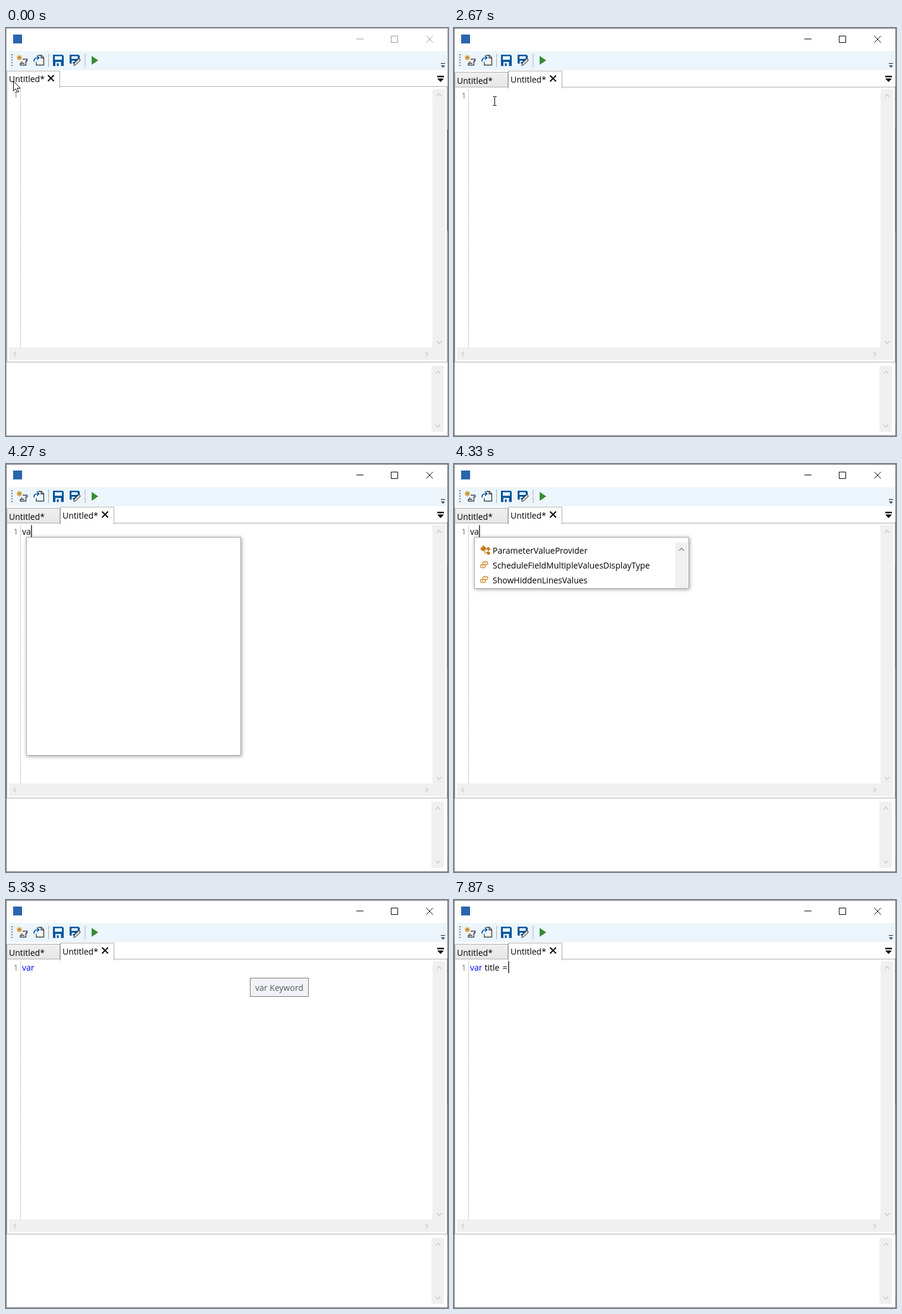
Recreate the animation shown at these times as an HTML page. Size 743x687 px, loop 8000 ms.

```html
<!DOCTYPE html>
<html lang="en">
<head>
<meta charset="utf-8">
<title>Script editor</title>
<style>
  html, body { margin: 0; width: 100%; height: 100%; overflow: hidden; background: #fff; }
  svg { display: block; width: 743px; height: 687px; font: 14px "Open Sans", "Noto Sans", sans-serif; }
  text { white-space: pre; }
  .line { fill: none; stroke: #acacac; }
  .bar { fill: #f0f0f0; }
  .chev { fill: none; stroke: #cdcdcd; stroke-width: 1.6; }
  .close { fill: none; stroke: #111; stroke-width: 2.2; }
  .blue { fill: #00539c; }
  .dark { fill: none; stroke: #3c3c3c; stroke-width: 1.4; }
  .gold { fill: none; stroke: #c27d1a; stroke-width: 1.2; }
  #popup { filter: drop-shadow(1px 1px 3px #0006); }
</style>
</head>
<body>
<svg viewBox="0 0 743 687">
  <defs>
    <path id="chev" class="chev" d="M-4 2L0-2L4 2"/>
    <path id="x" class="close" d="M-5-5L5 5M5-5L-5 5"/>
    <linearGradient id="tabFill" x2="0" y2="1">
      <stop stop-color="#f0f0f0"/><stop offset="1" stop-color="#e5e5e5"/>
    </linearGradient>
    <g id="enum" class="gold">
      <rect x="4.6" y=".6" width="8" height="5" rx="1.5"/>
      <rect x=".6" y="5.6" width="8" height="5" rx="1.5" fill="#fff"/>
      <path d="M7 3h3M3 8h3"/>
    </g>
  </defs>
  <rect width="743" height="687" fill="#fff"/>

  <!-- title bar -->
  <rect x="12" y="11" width="15" height="15" fill="#2a66ad"/>
  <path id="winButtons" fill="none" d="M589 18.5h12M647.5 13.5h11v11h-11zM706.5 13.5l11 11M717.5 13.5l-11 11"/>

  <!-- toolbar -->
  <rect x="5" y="39" width="736" height="32" rx="2" fill="#ecf5fc"/>
  <rect id="hover" x="14" y="41" width="27" height="27" fill="#cfe3f2"/>
  <path d="M10 44v20" stroke="#6b7480" stroke-width="2" stroke-dasharray="2 2.5"/>
  <path d="M22.5 45.5v9M18 50h9M19.3 46.8l6.4 6.4M25.7 46.8l-6.4 6.4" stroke="#d08a1d" stroke-width="1.4"/>
  <path class="dark" d="M28 52.5h7.5v3h-2v7h-9.5v-3h7M26.5 56v3.5"/>
  <path class="dark" d="M54 46h5.500l4 4v12.500h-12.500v-5M59 46v4.500h4.500"/>
  <path d="M47.500 56.500c-1.500-5 2-6.500 7-6.500M52 46.500l3.500 3.500l-3.500 3.500" fill="none" stroke="#00539c" stroke-width="1.700"/>
  <path d="M71.500 43v23M133 43v23" stroke="#a6adb5"/>
  <path class="blue" fill-rule="evenodd" d="M79 45h16l2 2v17h-18zM82 47.500v6h12v-6zM83 57v7h2.500v-4.500h3v4.500h4v-7z"/>
  <path class="blue" fill-rule="evenodd" d="M107 45h15l2 2v4l-9 9h-8zM110 47.500v4.500h10.500v-4.500zM110.500 55v5h2v-3h3v-2z"/>
  <path d="M114 63l1-4l7.500-7.500l2.500 2.500l-7.500 7.500z" fill="#fff" stroke="#444" stroke-width="1.200"/>
  <path d="M144 47l11 7.500l-11 7.500z" fill="#388a34"/>
  <path d="M731 59h7v1.500h-7zM731 63h7l-3.500 4z" fill="#444c55"/>

  <!-- document area -->
  <path class="line" d="M1.500 98V562.500H741.500V98"/>
  <path d="M725 80.500h11v2.500h-11zM725 85h11l-5.500 6z" fill="#000"/>
  <g id="oneTab">
    <path class="line" d="M1.500 99V72.500H90.500V98.500H742M90.500 98v3"/>
    <text x="5" y="91">Untitled*</text>
    <use href="#x" x="75.500" y="84.500"/>
  </g>
  <g id="twoTabs">
    <rect class="line" x="1.500" y="74.500" width="89" height="25" style="fill:url(#tabFill)"/>
    <text x="5" y="94">Untitled*</text>
    <path class="line" d="M91.500 102V72.500H181.500V102M181.500 99.500H742"/>
    <text x="95" y="92">Untitled*</text>
    <use href="#x" x="166.500" y="85"/>
  </g>
  <rect class="bar" x="717" y="103" width="21" height="456"/>
  <rect class="bar" x="5" y="538" width="713" height="21"/>
  <rect class="bar" x="715" y="569" width="21" height="111"/>
  <use id="upArrow" href="#chev" x="728"/>
  <use href="#chev" transform="translate(728 529) rotate(180)"/>
  <use href="#chev" transform="translate(15 549) rotate(-90)"/>
  <use href="#chev" transform="translate(707 549) rotate(90)"/>
  <use href="#chev" x="726" y="580"/>
  <use href="#chev" transform="translate(726 670) rotate(180)"/>
  <path d="M24.500 103V538" stroke="#a0a0a0" stroke-dasharray="1 1"/>

  <!-- editor -->
  <text id="lineNo" x="12.500" fill="#808080">1</text>
  <text id="keyword" x="27" y="119"></text>
  <text id="word" x="51.500" y="119"></text>
  <text id="sign" x="81.500" y="119"></text>
  <rect id="caret" y="103" width="1.300" height="20"/>

  <!-- completion list -->
  <g id="popup">
    <rect id="frame" class="line" x="34.500" y="123.500" width="360" style="fill:#fff"/>
    <g id="rows">
      <rect class="bar" x="372" y="132" width="21" height="77"/>
      <use href="#chev" x="382.500" y="144" style="filter:brightness(.7)"/>
      <path d="M44 143l5.500-6l5 4.500l-5.500 6zM54 142.500l3.500-3l4 3.500l-3.500 3.500zM54 149.500l3.500-3l4 3.500l-3.500 3.500z" fill="#c27d1a"/>
      <path class="gold" d="M50 144h5M52 144v6h4"/>
      <use href="#enum" x="44" y="164"/>
      <use href="#enum" x="44" y="189"/>
      <text x="65" y="151">ParameterValueProvider</text>
      <text x="65" y="176">ScheduleFieldMultipleValuesDisplayType</text>
      <text x="65" y="201">ShowHiddenLinesValues</text>
    </g>
  </g>
  <g id="tip">
    <rect x="410.500" y="131.500" width="98" height="31" fill="#f1f2f7" stroke="#767676"/>
    <text x="419" y="153" fill="#575757">var Keyword</text>
  </g>

  <rect id="border" x=".5" y=".5" width="742" height="686" fill="none"/>
  <path d="M742.500 171V342" stroke="#555"/>
  <path id="arrow" d="M.5.500v16.500l3.700-3.600l2.600 5.800l2.500-1.100l-2.500-5.700h5.200z" fill="#fff" stroke="#000"/>
  <path id="beam" d="M-3-7.500h2.500l.5.500l.5-.5h2.500M0-7v14M-3 7.500h2.500l.5-.5l.5.500h2.500" fill="none" stroke="#000"/>
</svg>
<script>
const LOOP = 8000;
const $ = id => document.getElementById(id);
const show = (id, on) => $(id).style.display = on ? "" : "none";
const set = (id, attrs) => { for (const k in attrs) $(id).setAttribute(k, attrs[k]); };
const clamp = v => Math.max(0, Math.min(1, v));

// time, keyword, word, sign, caret x
const typing = [
  [0, "", "", "", 27],
  [4130, "v", "", "", 34.5],
  [4270, "va", "", "", 42],
  [4470, "var", "", "", 47],
  [5330, "var", "", "", 51],
  [5870, "var", "ti", "", 60],
  [6000, "var", "titl", "", 69],
  [6330, "var", "tit", "", 65],
  [6400, "var", "t", "", 56.3],
  [6470, "var", "", "", 51],
  [6730, "var", "t", "", 56.3],
  [6870, "var", "ti", "", 60],
  [7000, "var", "tit", "", 65],
  [7130, "var", "titl", "", 69],
  [7330, "var", "title", "", 76.5],
  [7730, "var", "title", "", 81],
  [7870, "var", "title", "=", 91]
];
const caretOn = [[730, 1600], [2130, 2670], [3200, 5070], [5600, LOOP]];

// time, x, y
const path = [
  [0, 12, 89], [70, 12, 89], [500, 38, 57], [870, 38, 57],
  [1270, 64, 129], [1400, 64, 129], [1730, 68, 123], [LOOP, 68, 123]
];

function pointer(t) {
  const i = path.findIndex(p => p[0] > t);
  const [t0, x0, y0] = path[i - 1], [t1, x1, y1] = path[i];
  const u = (t - t0) / (t1 - t0), e = u * u * (3 - 2 * u);
  return [Math.round(x0 + (x1 - x0) * e), Math.round(y0 + (y1 - y0) * e)];
}

function draw(t) {
  const active = t >= 600, two = t >= 730;
  set("winButtons", { stroke: active ? "#000" : "#999" });
  set("border", { stroke: active ? "#707070" : "#a6a6a6" });
  show("oneTab", !two);
  show("twoTabs", two);
  set("lineNo", { y: two ? 119 : 117 });
  set("upArrow", { y: two ? 114 : 113 });

  const [x, y] = pointer(t), inText = y > 98;
  show("hover", x >= 14 && x < 41 && y >= 41 && y < 68);
  show("arrow", !inText);
  show("beam", inText && t < 3530);
  set("arrow", { transform: `translate(${x} ${y})` });
  set("beam", { transform: `translate(${x + .5} ${y})` });

  const [, keyword, word, sign, caretX] = typing.findLast(s => s[0] <= t);
  $("keyword").textContent = keyword;
  $("word").textContent = word;
  $("sign").textContent = sign;
  set("keyword", { fill: keyword === "var" ? "#0000ff" : "#000" });
  set("caret", { x: caretX + .2 });
  show("caret", caretOn.some(([a, b]) => t >= a && t < b));

  show("popup", t >= 4070 && t < 5330);
  set("frame", { height: t < 4330 ? 367 : 86 });
  show("rows", t >= 4330);
  set("tip", { opacity: t < 4530 ? 0 : 1 - clamp((t - 5390) / 200) });
}

function tick() {
  draw(performance.now() % LOOP);
  requestAnimationFrame(tick);
}
tick();
</script>
</body>
</html>
```
